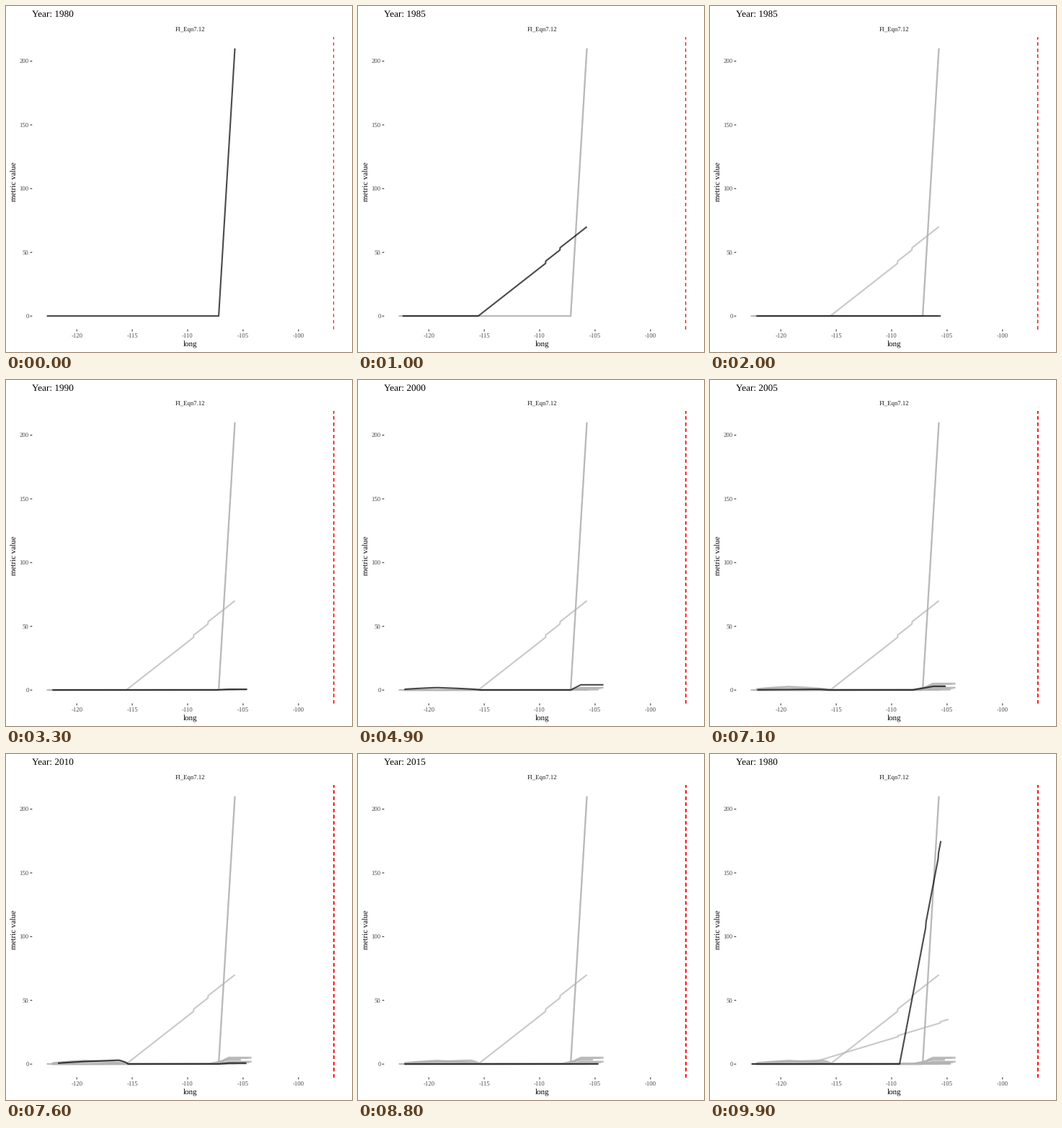
These frames come from a looping animation (480x480 px, 10000 ms). A matplotlib script:

```python
import numpy as np
import matplotlib.pyplot as plt
from matplotlib.animation import FuncAnimation

plt.rcParams["font.family"] = "Liberation Serif"
plt.rcParams["text.hinting"] = "none"

SIZE, DPI = 480, 72
FRAMES, INTERVAL = 100, 100
STEPS = 6          # frames per transition
TRAIL = 5          # every fifth frame leaves a shadow
STARTS = [7, 20, 33, 46, 59, 71, 83, 95]
FIRST, COUNT = 1980, 8
T = np.linspace(0, 1, 601)
WEST, EAST = -122.2, -104.7


def curve(west=WEST, east=EAST, hump=0, peak=-119.3, step=0, onset=-107.2):
    return dict(west=west, east=east, hump=hump, peak=peak, step=step, onset=onset)


CURVES = [
    curve(west=-122.7, east=-105.74),
    curve(east=-105.74),
    curve(step=.3),
    curve(east=-104.25, step=1.8),
    curve(east=-104.25, hump=2.8, step=5.2),
    curve(east=-105.2, step=3.3, onset=-108.2),
    curve(west=-121.7, hump=3, peak=-116.2, step=.7),
    curve(),
]
# Where the points of a neighbouring year bunch up along the steep climb.
PAUSES = {1: (.59, .74), 7: (.61, .92)}
PAUSE_LENGTH = .025


def value_to_y(value):
    return 430.2 - 1.7685 * np.asarray(value)


def long_to_x(lon):
    return 98.2 + 15.38 * (lon + 120)


def smooth_year(c, lon):
    """A western hump that fades out plus an eastern step."""
    tent = np.interp(lon, [c["west"] - .4, c["peak"], -115.4], [0, 1, 0])
    rise = np.interp(lon, [c["onset"], -106.3], [0, 1])
    return .1 + c["hump"] * tent ** .6 + c["step"] * rise


def sample(index, other):
    """Longitudes and values of a year, paired point by point with another."""
    c = CURVES[index]
    west, east = c["west"], c["east"]
    if index == 0:
        lon = np.interp(T, [0, .5, 1], [west, c["onset"], east])
        return lon, np.interp(T, [.5, 1], [.1, 210])
    if other == 0:
        climb = np.clip(2 * T - 1, 0, 1)
        for p in PAUSES[index]:
            climb = climb - np.clip(2 * T - 1 - p, 0, PAUSE_LENGTH)
        foot = west + 2.5
        lon = np.where(T < .5, west + (foot - west) * 2 * T,
                       foot + (east - foot) * climb / climb[-1])
    else:
        lon = west + (east - west) * T
    return lon, smooth_year(c, lon)


def state_at(frame):
    """Index of the current year and the step towards the next one."""
    passed = sum(frame >= start for start in STARTS)
    if passed:
        step = frame - STARTS[passed - 1] + 1
        if step < STEPS:
            return passed - 1, step
    return passed % COUNT, 0


def path_at(frame):
    index, step = state_at(frame)
    following = (index + 1) % COUNT
    lon0, v0 = sample(index, following)
    lon1, v1 = sample(following, index)
    k = step / STEPS
    return long_to_x(lon0 + (lon1 - lon0) * k), value_to_y(v0 + (v1 - v0) * k)


fig = plt.figure(figsize=(SIZE / DPI, SIZE / DPI), dpi=DPI, facecolor="white")
ax = fig.add_axes([0, 0, 1, 1])
ax.set(xlim=(0, SIZE), ylim=(SIZE, 0))
ax.axis("off")


def label(x, y, text, size, color="black", **kw):
    kw.setdefault("ha", "center")
    kw.setdefault("va", "baseline")
    return ax.text(x, y, text, fontsize=size, color=color, **kw)


def stroke(xs, ys, color, lw=1.07, **kw):
    line, = ax.plot(xs, ys, color=color, lw=lw, snap=False,
                    solid_capstyle="butt", solid_joinstyle="round", **kw)
    return line


def red_marker():
    x = long_to_x(-96.83)
    return stroke([x, x], [448.6, 43], "red", dashes=(4, 4),
                  dash_capstyle="butt", zorder=4)


for lon in range(-120, -99, 5):
    x = long_to_x(lon)
    stroke([x, x], [448.6, 451.4], "#333333")
    label(x, 461, str(lon), 8.8, "#4D4D4D")
for value in range(0, 201, 50):
    y = value_to_y(value)
    stroke([33.5, 36.3], [y, y], "#333333")
    label(31.7, y + 3.8, str(value), 8.8, "#4D4D4D", ha="right")

label(255.3, 35, "FI_Eqn7.12", 8.8, "#1A1A1A")
label(255.3, 473, "long", 11)
label(16, 244, "metric value", 11, rotation=90, ha="right", va="center")
title = label(36.3, 15, "", 13.2, ha="left")

red_marker()
shadows = []
for mark in range(0, FRAMES, TRAIL):
    trail = stroke(*path_at(mark), "#B3B3B3", 2.13, alpha=.7, zorder=2)
    shadows.append((mark, trail, red_marker()))
current = stroke([], [], "black", 2.13, alpha=.7, zorder=3)


def draw(frame):
    index, step = state_at(frame)
    current.set_data(*path_at(frame))
    shown = (index + (step > STEPS / 2)) % COUNT
    title.set_text(f"Year: {FIRST + 5 * shown}")
    for mark, *lines in shadows:
        for line in lines:
            line.set_visible(mark < frame)
    return [current, title]


anim = FuncAnimation(fig, draw, frames=FRAMES, interval=INTERVAL,
                     repeat=True, repeat_delay=0, blit=False)
plt.show()
```
